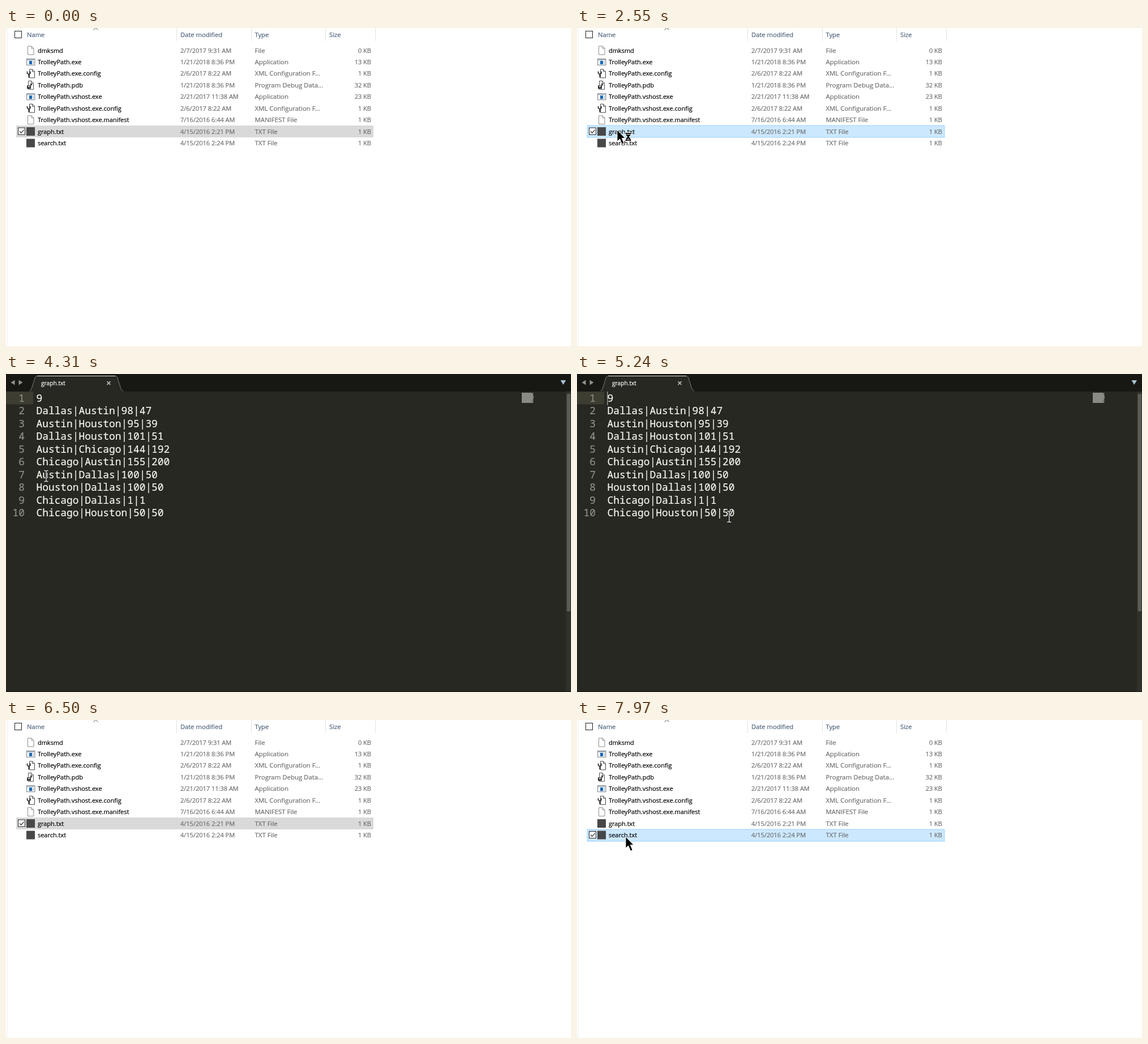
Recreate the animation shown at these times as an HTML page. Size 998 by 561 pixels, loop 8000 ms.

```html
<!DOCTYPE html>
<html lang="en">
<head>
<meta charset="utf-8">
<title>File list and editor</title>
<style>
  html, body { margin: 0; width: 100%; height: 100%; overflow: hidden; background: #fff; }
  svg { display: block; width: 998px; height: 561px; }
  text { font-family: "Open Sans", "Noto Sans", sans-serif; font-size: 11px; white-space: pre;
    color: #000; fill: currentColor; stroke: currentColor; stroke-width: .2px; }
  .head { color: #4c607a; font-size: 11.2px; }
  .info { color: #6d6d6d; }
  .type { font-size: 11.4px; }
  .end { text-anchor: end; }
  .code, .num { font: 17.88px "Noto Sans Mono", "DejaVu Sans Mono", monospace; color: #f8f8f2; }
  .num { color: #8f908a; }
  .tab { font-size: 10.2px; color: #fff; }
</style>
</head>
<body>
<svg id="stage" viewBox="0 0 998 561"></svg>
<script>
const LOOP = 8000, ROW_TOP = 29.3, ROW_H = 20.43;
const OPEN = 2620, CLOSE = 6500, RESELECT = 7970;
const APP = "TrolleyPath";

// name, date, type, size, icon
const files = [
  ["dmksmd", "2/7/2017 9:31 AM", "File", 0, "page"],
  [APP + ".exe", "1/21/2018 8:36 PM", "Application", 13, "app"],
  [APP + ".exe.config", "2/6/2017 8:22 AM", "XML Configuration F...", 1, "config"],
  [APP + ".pdb", "1/21/2018 8:36 PM", "Program Debug Data...", 32, "debug"],
  [APP + ".vshost.exe", "2/21/2017 11:38 AM", "Application", 23, "app"],
  [APP + ".vshost.exe.config", "2/6/2017 8:22 AM", "XML Configuration F...", 1, "config"],
  [APP + ".vshost.exe.manifest", "7/16/2016 6:44 AM", "MANIFEST File", 1, "page"],
  ["graph.txt", "4/15/2016 2:21 PM", "TXT File", 1, "text"],
  ["search.txt", "4/15/2016 2:24 PM", "TXT File", 1, "text"]
];

const lines = ["9", "Dallas|Austin|98|47", "Austin|Houston|95|39", "Dallas|Houston|101|51",
  "Austin|Chicago|144|192", "Chicago|Austin|155|200", "Austin|Dallas|100|50",
  "Houston|Dallas|100|50", "Chicago|Dallas|1|1", "Chicago|Houston|50|50"];

// start, end, steps, first x, y, last x, y
const moves = [
  [290, 530, 4, 706, 509, 147, 276],
  [680, 1060, 6, 130, 255, 42, 174],
  [1230, 1310, 2, 38, 172, 49, 176],
  [1460, 1540, 2, 55, 178, 62, 180],
  [1690, 1770, 2, 66, 180, 71, 180],
  [4480, 4860, 6, 90, 190, 231, 242],
  [5020, 5400, 6, 240, 246, 285, 255],
  [5720, 5950, 4, 300, 230, 414, 39],
  [6750, 7190, 7, 330, 114, 95, 222],
  [7420, 7720, 5, 94, 218, 86, 206]
];

// time, caret opacity
const blink = [[2620, 1], [3010, .5], [3160, 0], [3700, .5], [3850, 1], [4080, .7], [4160, .35],
  [4310, 0], [4780, .5], [4860, 1], [5170, .5], [5250, 0], [5800, .5], [5950, 1],
  [6180, .7], [6250, .35], [6330, 0]];

const text = (x, y, s, cls = "") => `<text x="${x}" y="${y}" class="${cls}">${s}</text>`;
const rect = (x, y, w, h, fill, more = "") =>
  `<rect x="${x}" y="${y}" width="${w}" height="${h}" fill="${fill}" ${more}/>`;
const path = (d, fill, more = "") => `<path d="${d}" fill="${fill}" ${more}/>`;
const line = (color, width = 1) => `stroke="${color}" stroke-width="${width}"`;

// Icons are drawn around the middle of the row
const sheet = (x, w, color) =>
  path(`M${x} -7.5h${w - 4}l4 4v11h${-w}z`, "#fff", line(color)) +
  path(`M${x + w - 4} -7.5v4h4`, "none", line(color));
const icons = {
  page: sheet(38.5, 10.5, "#8c8c8c"),
  app: rect(36.5, -5.5, 14.5, 11, "#f4f6f8", line("#7d868f")) + rect(37, -5, 13.5, 2, "#a9b3bc") +
    rect(41, -2, 5, 6, "#1667b7") + rect(47.5, -1.5, 2, 5, "#c4cbd1"),
  config: sheet(41.5, 9, "#444") +
    path("M37.5 -4v3.5l2 1.5h1.5l2 -1.5v-3.5M40.2 1v6", "none", line("#222", 1.5)),
  debug: sheet(39.5, 9, "#555") + rect(37, .5, 7, 6, "#333") + rect(39, 1.5, 3, 2, "#ddd") +
    '<circle cx="44.5" cy="-1" r="2" fill="#555"/>',
  text: rect(36, -7.5, 15, 15, "#484848")
};

function fileRow([name, date, type, size, icon], i) {
  const mid = ROW_TOP + ROW_H * (i + .5);
  return rect(18, Math.round(mid - 10.3), 631, 21, "none", `id="bar${i}"`) +
    `<g transform="translate(0 ${mid.toFixed(2)})">
    <g id="box${i}">${rect(21.5, -6.5, 12, 12, "#fff", line("#222"))}
      ${path("M24 -.5l2.7 3l5 -5.5", "none", `id="tick${i}" ` + line("#222", 1.2))}</g>
    ${icons[icon]}${text(55.9, 4, name)}${text(308, 4, date, "info")}
    ${text(439.5, 4, type, "info type")}${text(645, 4, size + " KB", "info end")}</g>`;
}

function explorer() {
  const heads = [[37, "Name"], [308, "Date modified"], [439.5, "Type"], [571, "Size"]];
  return rect(0, 0, 998, 561, "#fff") + rect(2, 0, 1, 560, "#f0f0f0") +
    [301, 433, 564, 652].map(x => rect(x, 0, 1, 23, "#e3e3e3")).join("") +
    rect(15.5, 5.5, 12, 12, "#fff", line("#222")) +
    path("M154.5 3.5l4 -4l4 4", "none", line("#555")) +
    heads.map(([x, s]) => text(x, 15.5, s, "head")).join("") +
    files.map(fileRow).join("");
}

function editor() {
  const rows = lines.map((s, i) => {
    const y = 49 + 22.44 * i;
    return text(33, y, i + 1, "num end") + text(53.5, y, s, "code");
  });
  const map = lines.slice(1).map((s, i) =>
    path(`M911 ${34 + i * 2}h${s.length * .95}`, "none",
      line("#a3a49e", 1.3) + ` stroke-dasharray="2 .6" stroke-dashoffset="${i * 1.1}"`));
  return rect(0, 0, 998, 561, "#272822") + rect(0, 0, 998, 31, "#171814") +
    path("M40 31.5Q44 30 46 23L51 7Q52 3.5 56 3.5H192Q196 3.5 197 7L202 23Q204 30 208 31.5z", "#272822") +
    path("M42 30Q45 27 46 23L51 7Q52 3.5 56 3.5", "none", line("#aaa") + ' stroke-dasharray="2 1"') +
    path("M192 3.5Q196 3.5 197 7L202 23Q204 29 207 30", "none", line("#aaa") + ' stroke-dasharray="2 1"') +
    path("M55 3.5H193", "none", line("#eee")) +
    text(62, 19.5, "graph.txt", "tab") +
    path("M178.5 13l6 6m0 -6l-6 6", "none", line("#c4c4c0", 1.6)) +
    path("M15.5 10.5v9l-7 -4.5zM22.5 10.5v9l7 -4.5z", "#90918d") +
    path("M979.5 11h9.5l-4.75 8z", "#a9c3d1") +
    rect(0, 31, 48, 22.5, "#3e3d32") +
    rows.join("") +
    rect(911, 33, 20.5, 18, "#686963") + map.join("") +
    rect(989, 31, 9, 530, "#30312b") + rect(990.5, 35, 6.5, 384, "#5b5c56", 'rx="2"') +
    rect(0, 560, 998, 1, "#151612") +
    rect(53, 31, 1.6, 24, "#f8f8f0", 'id="caret"');
}

const arrow = path("M0 0V20L4.6 15.8L8.6 25L12.2 23.4L8.2 14.4H14z", "#000", line("#fff", .9));
const beamShape = "M-3.5 -9.5H-1.2L0 -8.5L1.2 -9.5H3.5M0 -8.5V8.5M-3.5 9.5H-1.2L0 8.5L1.2 9.5H3.5";
const beam = path(beamShape, "none", line("#111", 3)) + path(beamShape, "none", line("#eee", 1.3));
const glass = path("M14 4.5h11v2.5h-1q0 3.5 -3 5q3 1.5 3 5h1v2.5h-11v-2.5h1q0 -3.5 3 -5q-3 -1.5 -3 -5h-1z",
  "#000", line("#fff")) + path("M16.5 7.5h6M18.5 15h2M17 17h5", "none", line("#fff"));

document.getElementById("stage").innerHTML =
  `<g id="explorer">${explorer()}</g><g id="editor">${editor()}</g>
   <g id="pointer"><g id="arrow">${arrow}</g><g id="glass">${glass}</g><g id="beam">${beam}</g></g>`;

const el = id => document.getElementById(id);
const show = (id, on) => el(id).setAttribute("visibility", on ? "inherit" : "hidden");

function pointerAt(t) {
  if (t < 290 || (t >= 6020 && t < 6750)) return null;
  const [start, end, steps, x0, y0, x1, y1] = moves.filter(m => t >= m[0]).pop();
  const last = steps - 1;
  const k = Math.min(last, Math.floor((t - start) / (end - start) * last + 1e-6)) / last;
  const ease = k * (2 - k);
  return [x0 + (x1 - x0) * ease, y0 + (y1 - y0) * ease];
}

function drawRows(t, pos) {
  const selected = t < RESELECT ? 7 : 8;
  const hover = pos && pos[0] > 18 && pos[0] < 649 ? Math.floor((pos[1] - ROW_TOP) / ROW_H) : -1;
  files.forEach((_, i) => {
    const sel = i === selected, hot = i === hover, bar = el("bar" + i);
    bar.setAttribute("fill", sel ? (hot ? "#cce8ff" : "#d9d9d9") : hot ? "#e5f3ff" : "none");
    bar.setAttribute("stroke", sel && hot ? "#99d1ff" : "none");
    show("box" + i, sel || hot);
    show("tick" + i, sel);
  });
}

function draw(t) {
  const editing = t >= OPEN && t < CLOSE;
  const pos = pointerAt(t);
  show("explorer", !editing);
  show("editor", editing);
  show("pointer", pos);
  show("arrow", !editing);
  show("beam", editing);
  show("glass", t >= 2550 && t < OPEN);
  if (pos) el("pointer").setAttribute("transform", `translate(${pos[0]} ${pos[1]})`);
  if (editing) el("caret").setAttribute("opacity", blink.filter(b => t >= b[0]).pop()[1]);
  else drawRows(t, pos);
}

const begin = performance.now();
function tick() {
  draw((performance.now() - begin) % LOOP);
  requestAnimationFrame(tick);
}
tick();
</script>
</body>
</html>
```
